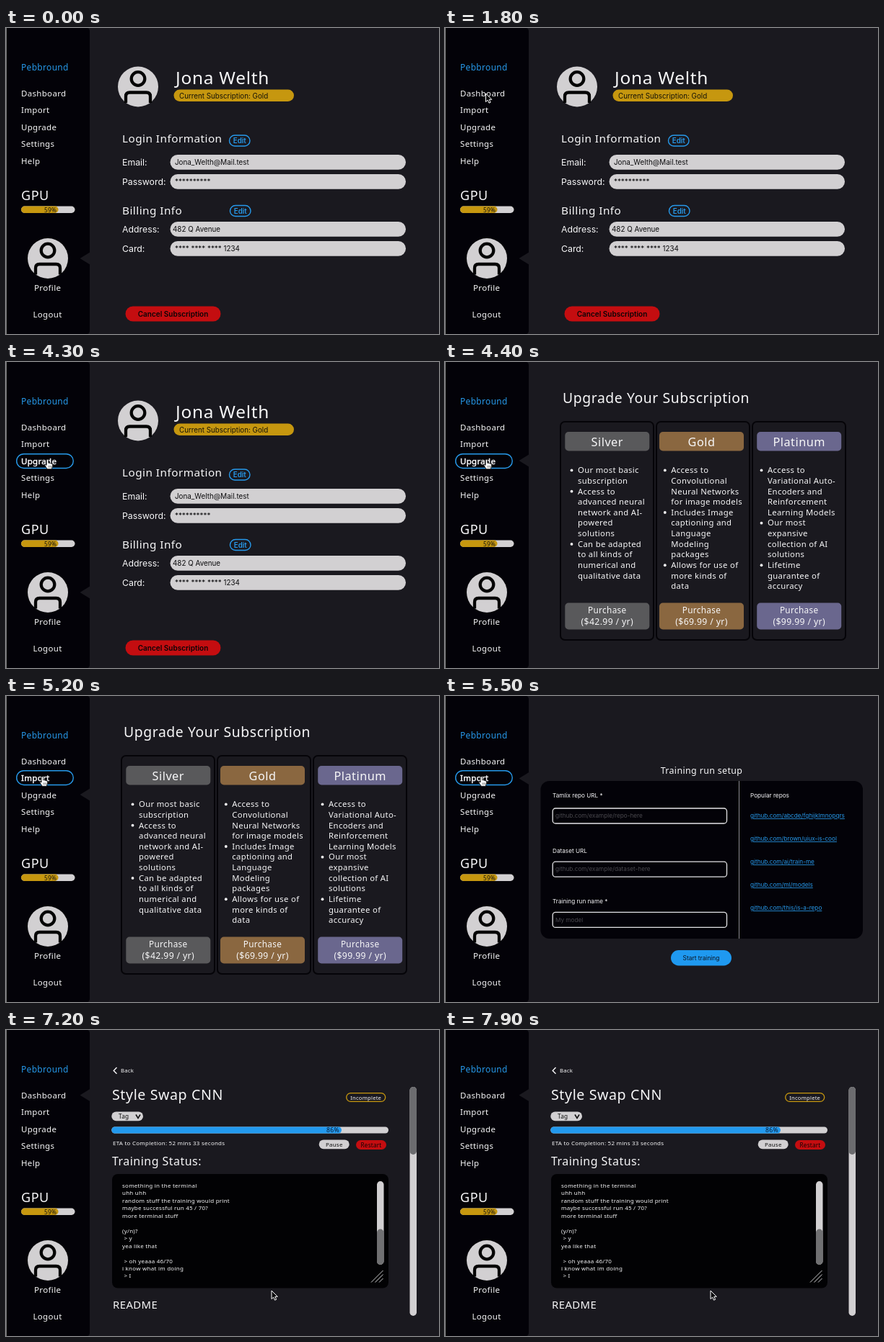
These frames come from a looping animation (600 px wide and 425 px high, 8 s). An HTML page:

```html
<!DOCTYPE html>
<html lang="en">
<head>
<meta charset="utf-8">
<title>Training dashboard</title>
<style>
html, body { margin: 0; width: 100%; height: 100%; overflow: hidden; background: #1a191f; }
svg { display: block; width: 600px; height: 425px; }
text { font-family: "Noto Sans", sans-serif; font-weight: 500; letter-spacing: .03em; }
.ui { font-family: Inter, sans-serif; font-weight: 400; letter-spacing: 0; }
.mid { text-anchor: middle; }
.bold { font-weight: 600; }
.link { text-decoration: underline; }
</style>
</head>
<body>
<svg id="stage" viewBox="0 0 600 425" xmlns="http://www.w3.org/2000/svg"></svg>
<script>
const WHITE = '#f7f7f8', BLUE = '#2799ea', GOLD = '#c6970f', RED = '#c40d10', LIGHT = '#d2d0d2', DARK = '#030208', BG = '#1a191f';

const esc = s => s.replace(/&/g, '&amp;').replace(/</g, '&lt;').replace(/>/g, '&gt;');
const type = (x, y, s, size, fill, cls) =>
  `<text x="${x}" y="${y}" font-size="${size}" fill="${fill}" class="${cls}">${esc(s)}</text>`;
const text = (x, y, s, size, fill = WHITE, cls = '') => type(x, y, s, size * .94, fill, cls);
const ui = (x, y, s, size, fill = WHITE, cls = '') => type(x, y, s, size, fill, 'ui ' + cls);
const box = (x, y, w, h, r, fill, stroke = 'none', sw = 1.4, extra = '') =>
  `<rect x="${x}" y="${y}" width="${w}" height="${h}" rx="${r}" fill="${fill}" stroke="${stroke}" stroke-width="${sw}" ${extra}/>`;
const line = (d, stroke, w) => `<path d="${d}" fill="none" stroke="${stroke}" stroke-width="${w}"/>`;
const group = (id, body) => `<g id="${id}">${body}</g>`;

const avatar = (x, y) => `<g transform="translate(${x} ${y})">
  <circle r="28" fill="${LIGHT}"/>
  <g fill="none" stroke="#050505" stroke-width="4.3">
    <circle cy="-11" r="9.3"/><path d="M-17 22.5V13.5q0-5.5 5.5-5.5h23q5.5 0 5.5 5.5v9"/>
  </g></g>`;

// Sidebar
const menu = [['Dashboard', 95], ['Import', 118], ['Upgrade', 142], ['Settings', 165], ['Help', 188.5]];
const sidebar = `<path d="M0 0H112q4 0 4 5V420q0 5-4 5H0z" fill="${DARK}"/>
  <path id="notch" d="M102.5 0L117-9V9z" fill="${BG}"/>`
  + box(0, 0, 1, 425, 0, '#777779')
  + text(21, 59, 'Pebbround', 12.7, BLUE)
  + menu.map(([s, y]) => text(21, y, s, 12.2)).join('')
  + text(21, 238.5, 'GPU', 19.2)
  + box(21, 247.5, 74.5, 9.5, 4.7, LIGHT) + box(21, 247.5, 51.5, 9.5, 4.7, GOLD)
  + text(53, 255.5, '59%', 8.8, '#111')
  + avatar(58, 320)
  + text(39, 365, 'Profile', 12.3) + text(37.5, 402, 'Logout', 12.2);

const hoverItem = (id, s, y) => group(id,
  box(14.7, y - 14.3, 78.6, 19.8, 9.9, DARK, BLUE)
  + `<g stroke="${WHITE}" stroke-width=".5">${text(21, y, s, 12.2)}</g>`);

// Profile page
const field = (y, label, x, value) => box(227.5, y, 326.5, 20.7, 10.3, LIGHT)
  + ui(161, y + 15.2, label, 12.3) + ui(x, y + 13.9, value, 9.85, '#0c0c0e');
const edit = (x, y) => box(x, y, 28.5, 15, 7.5, 'none', BLUE)
  + ui(x + 14.3, y + 11, 'Edit', 9.8, BLUE, 'mid bold');
const profile = avatar(183, 81.5)
  + text(235, 78, 'Jona Welth', 26)
  + box(232.5, 85.5, 166.5, 16.5, 8.2, GOLD)
  + ui(240, 97.7, 'Current Subscription: Gold', 9.8, '#141208')
  + text(161, 159, 'Login Information', 16.3) + edit(309.5, 149)
  + field(176, 'Email:', 234, 'Jona_Welth@Mail.test')
  + field(203, 'Password:', 234, '*'.repeat(10))
  + text(161, 259, 'Billing Info', 16.3) + edit(310.5, 246.5)
  + field(269, 'Address:', 231, '482 Q Avenue')
  + field(296, 'Card:', 234, '**** **** **** 1234')
  + box(165.5, 386.5, 132, 21, 10.5, RED)
  + ui(231.5, 400.6, 'Cancel Subscription', 10, '#0c0406', 'mid bold');

// Upgrade page: name, price, colour, left of the plates, left of the text, list (a leading * starts a bullet)
const plans = [
  ['Silver', '42', '#59595b', 166.3, 184, '*Our most basic|subscription|*Access to|advanced neural|network and AI-|powered|solutions|*Can be adapted|to all kinds of|numerical and|qualitative data'],
  ['Gold', '69', '#8a6740', 297, 313.3, '*Access to|Convolutional|Neural Networks|for image models|*Includes Image|captioning and|Language|Modeling|packages|*Allows for use of|more kinds of|data'],
  ['Platinum', '99', '#6a678e', 432.2, 447, '*Access to|Variational Auto-|Encoders and|Reinforcement|Learning Models|*Our most|expansive|collection of AI|solutions|*Lifetime|guarantee of|accuracy']
];
const card = ([name, price, color, x, left, list], i) => {
  const mid = x + 58.5;
  return box(160 + 133 * i, 83, 129, 303, 6, BG, '#050408', 2)
    + box(x, 97, 117, 26.5, 5, color)
    + text(mid, 116.8, name, 17.3, WHITE, 'mid')
    + list.split('|').map((s, n) => {
        const y = 154.2 + 14.65 * n, dot = s[0] === '*';
        return (dot ? `<circle cx="${left - 8.5}" cy="${y - 3.8}" r="1.9" fill="${WHITE}"/>` : '')
          + text(left, y, dot ? s.slice(1) : s, 12);
      }).join('')
    + box(x, 334.5, 117, 37, 5, color)
    + text(mid, 349.4, 'Purchase', 12.5, WHITE, 'mid')
    + text(mid, 365.2, `($${price}.99 / yr)`, 13, WHITE, 'mid');
};
const upgrade = text(163, 57, 'Upgrade Your Subscription', 20.6) + plans.map(card).join('');

// Import page
const entry = (y, label, labelY, hint) => ui(149, labelY, label, 8.2)
  + box(149.2, y, 241.3, 21, 4, 'none', '#e4e4e6', 1.3) + ui(153, y + 13.2, hint, 8.2, '#4a494e');
const repos = ['abcde/fghijklmnopqrs', 'brown/uiux-is-cool', 'ai/train-me', 'ml/models', 'this/is-a-repo'];
const importer = text(355.5, 107.5, 'Training run setup', 13.2, WHITE, 'mid')
  + box(132.5, 118, 446.5, 219, 12, DARK)
  + line('M407.5 118V337', '#8b8b8e', 1)
  + entry(156, 'Tamlix repo URL *', 141, 'github.com/example/repo-here')
  + entry(230.2, 'Dataset URL', 218, 'github.com/example/dataset-here')
  + entry(300.4, 'Training run name *', 288, 'My model')
  + ui(423, 141, 'Popular repos', 8.2)
  + repos.map((s, i) => ui(423, 169 + 32 * i, 'github.com/' + s, 8.2, BLUE, 'link')).join('')
  + box(313, 353, 84, 21.5, 10.7, '#1f99f0', 'none', 0, 'id="start"')
  + ui(355, 366.8, 'Start training', 8.4, '#0d1420', 'mid');

// Dashboard page
const log = ['something in the terminal', 'uhh uhh', 'random stuff the training would print',
  'maybe successful run 45 / 70?', 'more terminal stuff', '', '(y/n)?', ' > y', 'yea like that', '',
  ' > oh yeaaa 46/70', 'i know what im doing', ' > I'];
const dashboard = line('M153.5 52l-4.3 4.4 4.3 4.4', WHITE, 1.4) + text(159, 59.3, 'Back', 8.2)
  + text(147, 97, 'Style Swap CNN', 20.9)
  + box(471.7, 87.7, 54, 11.6, 5.8, 'none', GOLD, 1.3) + text(498.7, 96.6, 'Incomplete', 8.1, WHITE, 'mid')
  + box(146.3, 113.5, 43.7, 12.7, 6.3, LIGHT) + text(156, 123, 'Tag', 8.8, '#111')
  + line('M180 117.5l3 5 3-5', '#111', 1.6)
  + box(146.3, 134.5, 383.7, 9, 4.5, LIGHT) + box(146.3, 134.5, 318.7, 9, 4.5, '#2299ee')
  + text(444, 142.3, '86%', 9.2, '#0a1a30')
  + text(148, 159.5, 'ETA to Completion: 52 mins 33 seconds', 8.5)
  + box(433.7, 152.5, 42, 12.7, 6.3, LIGHT) + text(454.8, 161.9, 'Pause', 8.5, '#111', 'mid')
  + box(485, 153, 42, 13, 6.5, RED) + text(506, 162.5, 'Restart', 8.6, '#120305', 'mid')
  + text(147, 188, 'Training Status:', 17)
  + box(147, 200, 383, 158.5, 8, '#020204')
  + log.map((s, i) => text(s[0] === ' ' ? 163.5 : 161, 219 + 10.45 * i, s.trim(), 8.5)).join('')
  + box(514, 210, 9.5, 116, 4.7, LIGHT) + box(514, 276.5, 9.5, 49.5, 4.7, '#707072')
  + line('M506 350.5l16.5-16.5M511.5 350.5l11-11M517 350.5l5.5-5.5', '#c9c9cc', 1)
  + text(148, 387, 'README', 15.8)
  + box(559.5, 79, 9.5, 318, 4.7, LIGHT) + box(559.5, 79, 9.5, 94, 4.7, '#6c6c6f');

const cursors = group('arrow', `<path d="M0 0V11.6L2.7 9.1 4.5 13.2 6.6 12.3 4.8 8.3H8.3z" fill="#08080a" stroke="#fff"/>`)
  + group('hand', `<path d="M-1.4 7.5V.8a1.4 1.4 0 0 1 2.8 0V4.6q1.5-.9 2 .4 1.6-.7 2 .6 1.8-.4 1.8 1.2 0 3-1.5 6.2H-.3L-3.7 7.6q.4-1.7 2.3-.1z" fill="#fff" stroke="#111" stroke-width=".9"/>
    <path d="M1.5 8v3M3.3 8v3M5 8v3" stroke="#333" stroke-width=".6"/>`);

const $ = id => document.getElementById(id);
const pages = { profile, upgrade, importer, dashboard };
$('stage').innerHTML = box(0, 0, 600, 425, 0, BG) + sidebar
  + Object.keys(pages).map(k => group(k, pages[k])).join('')
  + hoverItem('onImport', 'Import', 118) + hoverItem('onUpgrade', 'Upgrade', 142) + cursors;

// Page changes: start time, page, height of the sidebar notch
const scenes = [[0, 'profile', 320], [4400, 'upgrade', 137], [5500, 'importer', 114.5], [6700, 'dashboard', 90.5]];
// Pointer stops: time, x, y
const stops = [[0, 422, 440], [300, 422, 432], [1200, 150, 150], [1700, 56.5, 91], [2300, 56.5, 91], [2700, 82, 99],
  [3100, 82, 127.5], [3600, 82, 127.5], [4000, 57.5, 135.8], [4500, 57.5, 135.8], [5000, 50.5, 112.3],
  [5700, 50.5, 112.3], [6500, 371, 360.5], [6600, 371, 360.5], [6800, 368, 362], [8000, 368, 362]];

function pointer(t) {
  const i = stops.findIndex(s => s[0] > t);
  const [t0, x0, y0] = stops[i - 1], [t1, x1, y1] = stops[i];
  const p = (t - t0) / (t1 - t0), e = p * p * (3 - 2 * p);
  return [x0 + (x1 - x0) * e, y0 + (y1 - y0) * e];
}

const show = (id, on) => $(id).setAttribute('display', on ? 'inline' : 'none');

function draw(now) {
  const t = Math.floor(now % 8000 / 100) * 100; // screen refreshes ten times a second
  const [, page, notchY] = scenes.filter(s => s[0] <= t).pop();
  const [x, y] = pointer(t);
  const inside = (l, top, r, b) => x > l && x < r && y > top && y < b;
  const onImport = inside(14, 104, 76, 124), onUpgrade = inside(14, 127, 76, 148);
  const onStart = page === 'importer' && inside(313, 353, 397, 375);
  const active = onImport || onUpgrade || onStart;

  for (const k in pages) show(k, k === page);
  show('onImport', onImport);
  show('onUpgrade', onUpgrade);
  show('arrow', !active);
  show('hand', active);
  $('start').setAttribute('fill', onStart ? '#0864e2' : '#1f99f0');
  $('notch').setAttribute('transform', `translate(0 ${notchY})`);
  for (const id of ['arrow', 'hand']) $(id).setAttribute('transform', `translate(${x} ${y})`);
}

const begin = performance.now();
function tick() {
  draw(performance.now() - begin);
  requestAnimationFrame(tick);
}
tick();
</script>
</body>
</html>
```
